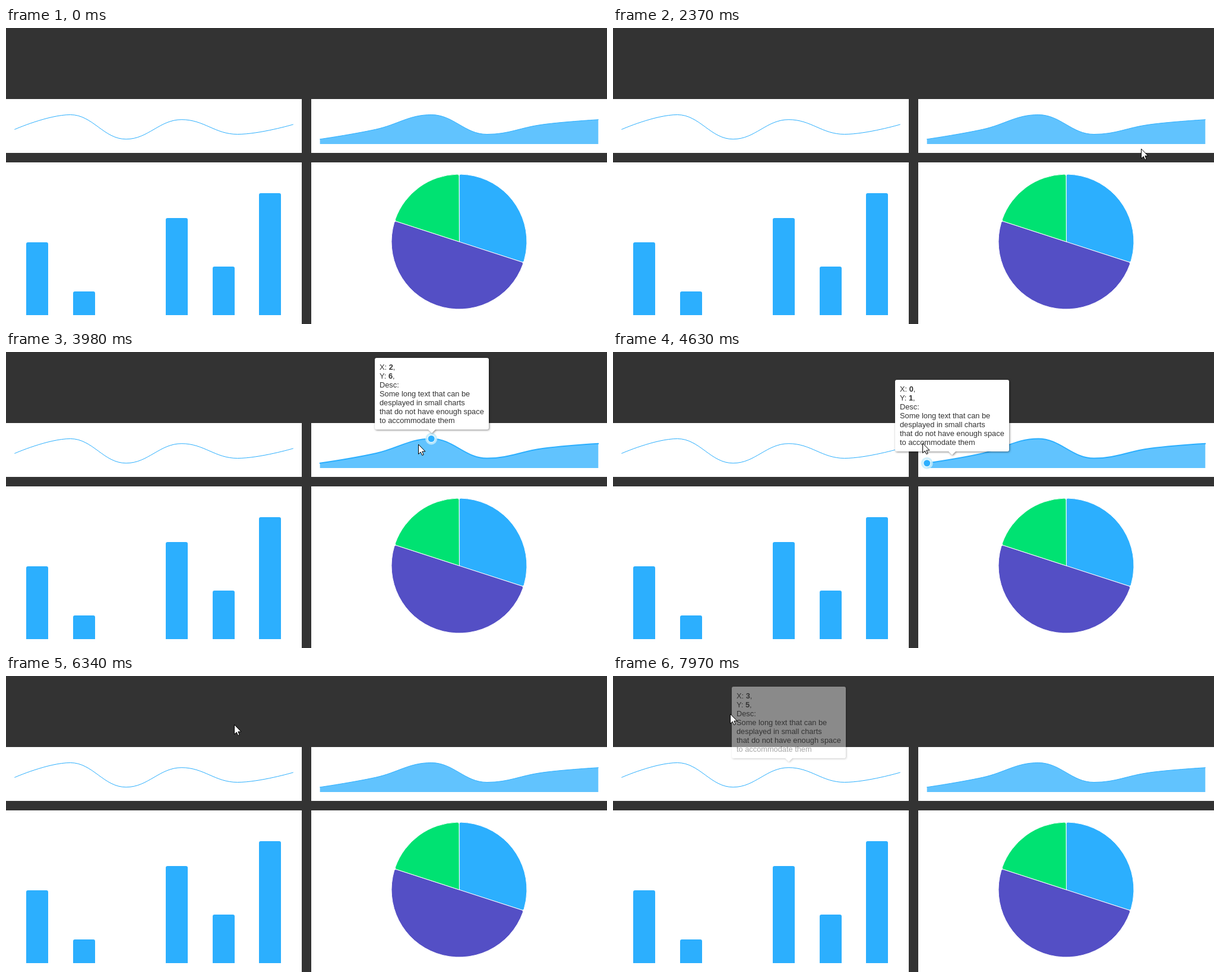
Animation of 1012 by 500 pixels, one loop 7990 ms. Source, as an HTML page with a canvas:

```html
<!DOCTYPE html>
<html lang="en">
<head>
<meta charset="utf-8">
<title>Small chart tooltips</title>
<style>
html, body { margin: 0; width: 100%; height: 100%; overflow: hidden; background: #333; }
canvas { display: block; }
</style>
</head>
<body>
<canvas id="stage" width="1012" height="500"></canvas>
<script>
const LOOP = 7990;
const BLUE = '#2caffe';
const TAU = Math.PI * 2;
const PANEL_W = 498;
const STEP = 93.73;
const BOX = { w: 192, h: 121, pad: 8 };
const ctx = document.getElementById('stage').getContext('2d');

// Key points of the pointer's path: time, x, y.
const route = [
  [810, 957, 492], [1290, 942, 411], [1600, 924, 348], [1950, 930, 305], [2370, 889, 204],
  [2700, 873, 172], [3020, 873, 172], [3320, 860, 168], [3370, 821, 167], [3800, 722, 157],
  [4570, 600, 155], [4630, 521, 154], [4773, 513, 151], [5000, 341, 138], [5300, 308, 132],
  [5850, 345, 78], [6340, 384, 82], [7030, 280, 148], [7080, 280, 148], [7876, 197, 64]
];

function slope(i, axis) {
  if (i === 0 || i === route.length - 1) return 0;
  const rate = j => (route[j + 1][axis] - route[j][axis]) / (route[j + 1][0] - route[j][0]);
  const before = rate(i - 1), after = rate(i);
  return before * after <= 0 ? 0 : 2 * before * after / (before + after);
}

function pointerAt(t) {
  const next = route.findIndex(key => key[0] > t);
  const [a, b] = next < 0 ? [route.at(-1), route.at(-1)] : [route[next - 1], route[next]];
  if (a === b) return { x: a[1], y: a[2] };
  const span = b[0] - a[0], u = (t - a[0]) / span;
  const [x, y] = [1, 2].map(axis => a[axis] + (b[axis] - a[axis]) * u * u * (3 - 2 * u)
    + span * u * (1 - u) * ((1 - u) * slope(next - 1, axis) - u * slope(next, axis)));
  return { x, y };
}

// The hovered point is the one nearest in x while the pointer is over the chart.
function hoveredPoint(left, t) {
  const { x, y } = pointerAt(t);
  if (x < left || x > left + PANEL_W || y < 120 || y > 203) return -1;
  return Math.min(5, Math.max(0, Math.round((x - left - 14.69) / STEP)));
}

function makeChart(left, area, values) {
  const points = values.map((v, i) => ({ x: left + 14.69 + STEP * i, y: 196 - 8.25 * v }));
  const hovers = [];
  let last = -1;
  for (let time = route[0][0]; time < LOOP; time++) {
    const index = hoveredPoint(left, time);
    if (index !== last) hovers.push({ time, index });
    last = index;
  }
  return { area, values, points, hovers, curve: curvePath(points) };
}

// Control points stay between neighbouring values so the curve never overshoots.
function splineControls(points, i) {
  const p = points[i], prev = points[i - 1], next = points[i + 1];
  if (!prev || !next) return { lx: p.x, ly: p.y, rx: p.x, ry: p.y };
  const mix = (a, b) => (1.5 * a + b) / 2.5;
  const clamp = (v, q) => Math.min(Math.max(v, Math.min(q, p.y)), Math.max(q, p.y));
  const lx = mix(p.x, prev.x), rx = mix(p.x, next.x);
  const half = (mix(p.y, next.y) - mix(p.y, prev.y)) / 2;
  const ly = clamp(p.y - half, prev.y);
  const ry = clamp(2 * p.y - ly, next.y);
  return { lx, ly: 2 * p.y - ry, rx, ry };
}

function curvePath(points) {
  const path = new Path2D();
  const controls = points.map((p, i) => splineControls(points, i));
  path.moveTo(points[0].x, points[0].y);
  for (let i = 1; i < points.length; i++) {
    const a = controls[i - 1], b = controls[i], p = points[i];
    path.bezierCurveTo(a.rx, a.ry, b.lx, b.ly, p.x, p.y);
  }
  return path;
}

function disc({ x, y }, r, fill) {
  ctx.fillStyle = fill;
  ctx.beginPath();
  ctx.arc(x, y, r, 0, TAU);
  ctx.fill();
}

function drawSeries({ points, area, curve }, active) {
  if (area) {
    const fill = new Path2D(curve);
    fill.lineTo(points[5].x, 196);
    fill.lineTo(points[0].x, 196);
    ctx.fillStyle = 'rgba(44,175,254,.75)';
    ctx.fill(fill);
  }
  ctx.strokeStyle = BLUE;
  ctx.lineWidth = active >= 0 ? 2 : 1;
  ctx.lineJoin = ctx.lineCap = 'round';
  ctx.stroke(curve);
  if (active < 0) return;
  disc(points[active], 10, 'rgba(196,236,252,.85)');
  disc(points[active], 6.5, '#fff');
  disc(points[active], 5.5, BLUE);
}

function drawBars() {
  ctx.fillStyle = BLUE;
  [3, 1, 0, 4, 2, 5].forEach((v, i) => {
    if (!v) return;
    const top = Math.floor(486.7 - 41.4 * v);
    ctx.beginPath();
    ctx.roundRect(Math.floor(34.8 + 78.3 * i), top, 37, 485 - top, [3, 3, 0, 0]);
    ctx.fill();
  });
}

function drawPie() {
  const cx = 763, cy = 361, r = 114, corner = 3, inset = corner / r;
  const at = (angle, radius) => [cx + radius * Math.cos(angle), cy + radius * Math.sin(angle)];
  let start = -TAU / 4;
  ctx.strokeStyle = '#fff';
  ctx.lineWidth = 1;
  for (const [share, color] of [[.3, BLUE], [.5, '#544fc5'], [.2, '#00e272']]) {
    const end = start + TAU * share;
    ctx.beginPath();
    ctx.moveTo(cx, cy);
    ctx.lineTo(...at(start, r - corner));
    ctx.quadraticCurveTo(...at(start, r), ...at(start + inset, r));
    ctx.arc(cx, cy, r, start + inset, end - inset);
    ctx.quadraticCurveTo(...at(end, r), ...at(end, r - corner));
    ctx.closePath();
    ctx.fillStyle = color;
    ctx.fill();
    ctx.stroke();
    start = end;
  }
}

const tipLayer = document.createElement('canvas');
tipLayer.width = BOX.w + 2 * BOX.pad;
tipLayer.height = BOX.h + 3 * BOX.pad;
const tip = tipLayer.getContext('2d');

// Drawn on its own layer so that the whole tooltip fades as one.
function renderTip(index, value) {
  const { w, h, pad } = BOX;
  tip.clearRect(0, 0, tipLayer.width, tipLayer.height);
  tip.save();
  tip.translate(pad, pad);
  tip.fillStyle = '#fff';
  tip.shadowColor = 'rgba(0,0,0,.5)';
  tip.shadowBlur = 3.5;
  tip.shadowOffsetX = tip.shadowOffsetY = 1;
  tip.beginPath();
  tip.roundRect(0, 0, w, h, 3);
  tip.moveTo(w / 2 + 6, h);
  tip.lineTo(w / 2, h + 6);
  tip.lineTo(w / 2 - 6, h);
  tip.fill();
  tip.shadowColor = 'transparent';
  tip.fillStyle = '#333';

  const lines = [
    ['X: ', index, ','], ['Y: ', value, ','], ['Desc:'],
    ['Some long text that can be'], ['desplayed in small charts'],
    ['that do not have enough space'], ['to accommodate them']
  ];
  lines.forEach((parts, row) => {
    let x = 8;
    parts.forEach((part, i) => {
      tip.font = `${i === 1 ? 'bold ' : ''}12.8px "Liberation Sans", Arial, sans-serif`;
      tip.fillText(part, x, 20 + 15 * row);
      x += tip.measureText(part).width;
    });
  });
  tip.restore();
}

// The box closes a third of the gap in x and half in y every 32 ms;
// 500 ms after the pointer leaves it fades out.
function tooltipAt({ points, hovers }, t) {
  const past = hovers.filter(hover => hover.time <= t);
  let box = null, active = -1;
  past.forEach(({ time, index }, i) => {
    active = index;
    const until = past.slice(i + 1).find(hover => hover.index >= 0)?.time ?? t;
    if (index < 0) {
      const fade = Math.min(1, Math.max(0, (until - time - 500) / 150));
      box.alpha = (1 + Math.cos(Math.PI * fade)) / 2;
      return;
    }
    const x = points[index].x - BOX.w / 2, y = points[index].y - 136.6;
    const steps = Math.floor((until - time) / 32) + 1;
    const from = box && box.alpha > 0 ? box : { x, y };
    box = {
      x: x + (from.x - x) * (2 / 3) ** steps,
      y: y + (from.y - y) * .5 ** steps,
      index, alpha: 1
    };
  });
  return { active, box };
}

function drawTooltip(chart, box) {
  if (!box || box.alpha <= 0) return;
  renderTip(box.index, chart.values[box.index]);
  ctx.globalAlpha = box.alpha;
  ctx.drawImage(tipLayer, Math.round(box.x) - BOX.pad, Math.round(box.y) - BOX.pad);
  ctx.globalAlpha = 1;
}

const arrow = new Path2D('M.5.5V16.5L4.2 13 6.8 18.5 9.2 17.5 6.8 12H11.7Z');

function drawPointer({ x, y }) {
  ctx.save();
  ctx.translate(Math.round(x), Math.round(y));
  ctx.fillStyle = '#fff';
  ctx.strokeStyle = '#000';
  ctx.lineWidth = 1;
  ctx.lineJoin = 'miter';
  ctx.fill(arrow);
  ctx.stroke(arrow);
  ctx.restore();
}

const charts = [
  makeChart(514, true, [1, 3, 6, 2, 4, 5]),
  makeChart(0, false, [3, 6, 1, 5, 2, 4])
];

function draw(t) {
  ctx.fillStyle = '#333';
  ctx.fillRect(0, 0, 1012, 500);
  ctx.fillStyle = '#fff';
  for (const x of [0, 514]) {
    ctx.fillRect(x, 120, PANEL_W, 91);
    ctx.fillRect(x, 227, PANEL_W, 273);
  }
  drawBars();
  drawPie();
  const states = charts.map(chart => tooltipAt(chart, t));
  charts.forEach((chart, i) => drawSeries(chart, states[i].active));
  charts.forEach((chart, i) => drawTooltip(chart, states[i].box));
  if (t >= route[0][0]) drawPointer(pointerAt(t));
}

const begin = performance.now();
function tick() {
  draw((performance.now() - begin) % LOOP);
  requestAnimationFrame(tick);
}
tick();
</script>
</body>
</html>
```
